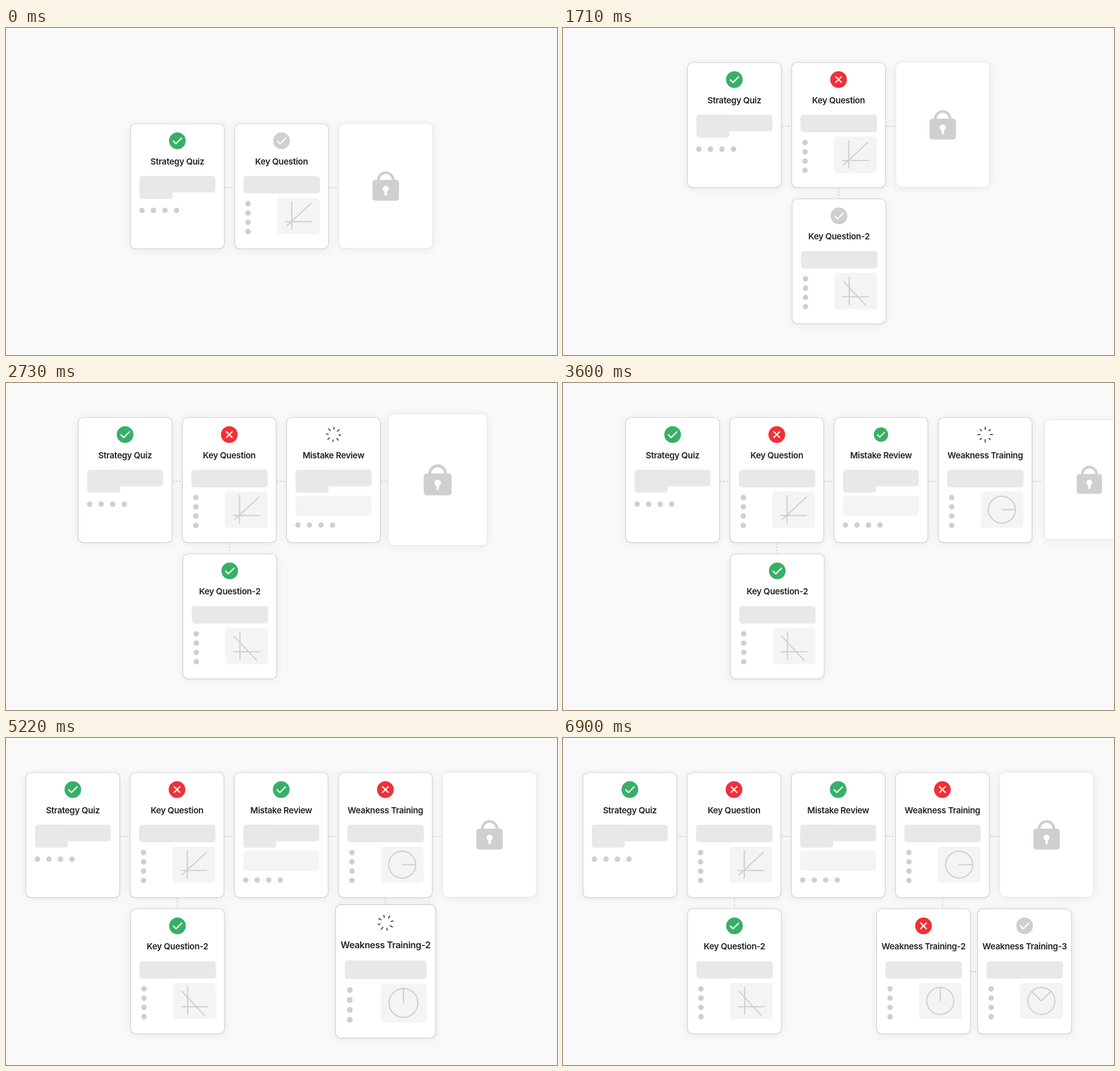
These frames come from a looping animation (971x577 px, 7.08 s). An HTML page with a canvas:

```html
<!DOCTYPE html>
<html lang="en">
<head>
<meta charset="utf-8">
<title>Learning path</title>
<style>
  html, body { margin: 0; width: 100%; height: 100%; overflow: hidden; background: #f9f9f9; }
  canvas { display: block; }
</style>
</head>
<body>
<canvas id="stage" width="971" height="577"></canvas>
<script>
const ctx = document.getElementById('stage').getContext('2d');
const LOOP = 7080;
const CARD_W = 165.4, CARD_H = 220.6, PITCH = 183.6;
const REVEAL = 285;
const GREY = '#cfcfcf', BLOCK = '#e8e8e8', PANEL = '#f4f4f4', GREEN = '#37b066', RED = '#f22f38';

// Start of each step of the path
const STEP = { retry: 705, review: 1950, training: 3300, retry2: 4500, retry3: 6000 };

const clamp = v => Math.max(0, Math.min(1, v));
const span = (t, start, length) => clamp((t - start) / length);
const easeInOut = u => u < 0.5 ? 2 * u * u : 1 - 2 * (1 - u) ** 2;
const glide = (t, start, length) => easeInOut(span(t, start, length));

// Card entrance: grows past full size, holds, then settles
function popScale(age) {
  if (age < 725) return 1.068 - 0.13 * (1 - span(age, 270, 400)) ** 2;
  return 1.068 - 0.068 * easeInOut(span(age, 725, 190));
}

function roundRect(x, y, w, h, r, fill) {
  ctx.beginPath();
  ctx.roundRect(x, y, w, h, r);
  ctx.fillStyle = fill;
  ctx.fill();
}

function disc(x, y, r, fill) {
  ctx.beginPath();
  ctx.arc(x, y, r, 0, Math.PI * 2);
  ctx.fillStyle = fill;
  ctx.fill();
}

function lines(color, width, ...paths) {
  ctx.beginPath();
  for (const [x, y, ...rest] of paths) {
    ctx.moveTo(x, y);
    for (let i = 0; i < rest.length; i += 2) ctx.lineTo(rest[i], rest[i + 1]);
  }
  ctx.strokeStyle = color;
  ctx.lineWidth = width;
  ctx.stroke();
}

function dots(x, y, dx, dy) {
  for (let i = 0; i < 4; i++) disc(x + i * dx, y + i * dy, 4.8, GREY);
}

function connector(x1, y1, x2, y2) {
  ctx.setLineDash([3, 2.5]);
  ctx.lineCap = 'butt';
  lines('#c9c9c9', 1.4, [x1, y1, x2, y2]);
  ctx.setLineDash([]);
}

function frame(border) {
  const x = -CARD_W / 2, y = -CARD_H / 2;
  ctx.save();
  ctx.shadowColor = 'rgba(0,0,0,0.07)';
  ctx.shadowBlur = 16;
  ctx.shadowOffsetY = 2;
  roundRect(x, y, CARD_W, CARD_H, 9, '#fff');
  ctx.restore();
  ctx.beginPath();
  ctx.roundRect(x, y, CARD_W, CARD_H, 9);
  ctx.strokeStyle = border;
  ctx.lineWidth = 1.2;
  ctx.stroke();
}

function textBlock() {
  roundRect(-66.8, -18, 133.8, 29, 5, BLOCK);
  roundRect(-66.8, -18, 58.2, 40.3, 5, BLOCK);
}

function chart(...paths) {
  lines(GREY, 2.1, [18, 27.5, 18, 76], [7, 62.4, 52.5, 62.4], ...paths);
}

function clock(...angles) {
  const cx = 29.5, cy = 52.2, r = 23.8;
  ctx.beginPath();
  ctx.arc(cx, cy, r, 0, Math.PI * 2);
  ctx.strokeStyle = GREY;
  ctx.lineWidth = 2.1;
  ctx.stroke();
  for (const deg of angles) {
    const a = deg * Math.PI / 180;
    lines(GREY, 2.1, [cx, cy, cx + r * Math.cos(a), cy + r * Math.sin(a)]);
  }
}

function question(drawFigure) {
  roundRect(-67, -18, 134.6, 30.6, 5, BLOCK);
  dots(-59, 30.8, 0, 16.4);
  roundRect(-8, 20.3, 75.4, 64.2, 6, PANEL);
  ctx.lineCap = 'round';
  drawFigure();
}

const bodies = {
  quiz() { textBlock(); dots(-62.4, 42.5, 20.3, 0); },
  review() {
    textBlock();
    roundRect(-66.8, 28, 134, 34.7, 5, PANEL);
    dots(-62.6, 79.4, 20.3, 0);
  },
  rising: () => question(() => chart([9, 70, 52, 30.3])),
  falling: () => question(() => chart([8, 35.3, 47.5, 77.8])),
  quarter: () => question(() => clock(0)),
  upright: () => question(() => clock(-90)),
  wedge: () => question(() => clock(-135, -45)),
};

function badge(color, scale) {
  ctx.save();
  ctx.scale(scale, scale);
  disc(0, 0, 14.7, color);
  ctx.lineCap = ctx.lineJoin = 'round';
  if (color === RED) lines('#fff', 2.3, [-5, -5, 5, 5], [5, -5, -5, 5]);
  else lines('#fff', 2.3, [-7.3, 0.4, -2.5, 5.2, 7.4, -4.8]);
  ctx.restore();
}

function spinner(age) {
  ctx.save();
  ctx.rotate(0.29 * (age - 300) * Math.PI / 180);
  ctx.lineCap = 'round';
  for (let i = 0; i < 8; i++) {
    lines('#555', 2, [0, i % 2 ? -9.5 : -9, 0, i % 2 ? -12.5 : -13]);
    ctx.rotate(Math.PI / 4);
  }
  ctx.restore();
}

function status(card, t) {
  const age = t - card.start, sinceVerdict = t - card.verdict;
  const ready = span(age, 780, 110);
  ctx.save();
  ctx.translate(0, -80.3);
  if (sinceVerdict >= 0) {
    const u = span(sinceVerdict, 0, 600);
    badge(u < 0.4 ? GREY : card.result, 1 - 0.14 * Math.sin(Math.PI * u));
  } else {
    if (ready < 1) {
      ctx.globalAlpha = 1 - ready;
      spinner(age);
    }
    ctx.globalAlpha = ready;
    badge(GREY, 1);
  }
  ctx.restore();
}

function placed(x, y, scale, draw) {
  ctx.save();
  ctx.translate(x, y);
  ctx.scale(scale, scale);
  draw();
  ctx.restore();
}

function drawCard(card, x, y, t) {
  const age = t - card.start;
  if (age < REVEAL) return;
  placed(x, y, card.pops ? popScale(age) : 1, () => {
    frame('#cfcfcf');
    bodies[card.body]();
    ctx.font = '600 15px Inter, sans-serif';
    ctx.letterSpacing = '-0.3px';
    ctx.textAlign = 'center';
    ctx.fillStyle = '#222';
    ctx.fillText(card.title, 0, -38.4);
    status(card, t);
  });
}

function drawLock(x, y, scale) {
  placed(x, y - 0.8, scale, () => {
    frame('#e7e7e7');
    ctx.beginPath();
    ctx.arc(0, -10, 13.1, Math.PI, 0);
    ctx.lineTo(13.1, -7);
    ctx.moveTo(-13.1, -10);
    ctx.lineTo(-13.1, -7);
    ctx.strokeStyle = GREY;
    ctx.lineWidth = 4.8;
    ctx.stroke();
    roundRect(-23.3, -10.5, 46.6, 36.7, 5, GREY);
    disc(0, 5.3, 5.4, '#fff');
    roundRect(-2.1, 6, 4.2, 11.5, 2.1, '#fff');
  });
}

const ALWAYS = -1e5, NEVER = 1e5;
const card = (title, body, start, verdict, result, pops) => ({ title, body, start, verdict, result, pops });

const mainRow = [
  card('Strategy Quiz', 'quiz', ALWAYS, ALWAYS, GREEN),
  card('Key Question', 'rising', ALWAYS, 510, RED),
  card('Mistake Review', 'review', STEP.review, STEP.training, GREEN),
  card('Weakness Training', 'quarter', STEP.training, STEP.retry2, RED),
];
const keyRetry = card('Key Question-2', 'falling', STEP.retry, STEP.review, GREEN, true);
const trainRetry = card('Weakness Training-2', 'upright', STEP.retry2, STEP.retry3, RED, true);
const trainRetry2 = card('Weakness Training-3', 'wedge', STEP.retry3, NEVER, GREY, true);

function draw(t) {
  const left = 302 - 92.1 * glide(t, STEP.review, 545) - 92.1 * glide(t, 3381, 730);
  const rowY = 279.3 - 108 * glide(t, STEP.retry, 545);
  const lowY = rowY + 240.5;
  const slide = glide(t, STEP.retry3, 618);
  const slotX = i => left + i * PITCH;
  const retryX = slotX(3) + 0.3 - 33.6 * slide;
  const shown = start => t >= start + REVEAL;
  const lastSlot = shown(STEP.training) ? 4 : shown(STEP.review) ? 3 : 2;

  ctx.fillStyle = '#f9f9f9';
  ctx.fillRect(0, 0, 971, 577);

  if (lastSlot === 2) drawLock(slotX(2), rowY, 1);
  else drawLock(slotX(lastSlot), rowY, popScale(t - (lastSlot === 3 ? STEP.review : STEP.training)));

  mainRow.forEach((item, i) => drawCard(item, slotX(i), rowY, t));

  for (let i = 0; i < lastSlot; i++) {
    const x = slotX(i) + CARD_W / 2 + 1;
    const gapEnd = i === lastSlot - 1 && lastSlot > 2
      ? Math.min(x + 17, slotX(lastSlot) - CARD_W / 2 * popScale(t - (lastSlot === 3 ? STEP.review : STEP.training)))
      : x + 17;
    connector(x, rowY + 2.2, gapEnd, rowY + 2.2);
  }
  const gapTop = rowY + CARD_H / 2 + 1;
  if (shown(STEP.retry)) connector(slotX(1) + 0.6, gapTop, slotX(1) + 0.6, gapTop + 18);
  if (shown(STEP.retry2)) connector(slotX(3), gapTop, slotX(3), gapTop + 18);
  if (shown(STEP.retry3)) connector(retryX + CARD_W / 2 + 1, lowY + 0.5, retryX + 96, lowY + 0.5);

  drawCard(keyRetry, slotX(1) + 0.8, lowY, t);
  drawCard(trainRetry, retryX, lowY, t);
  drawCard(trainRetry2, retryX + 178.2, lowY, t);
}

const begin = performance.now();
function tick() {
  draw((performance.now() - begin) % LOOP);
  requestAnimationFrame(tick);
}
tick();
</script>
</body>
</html>
```
